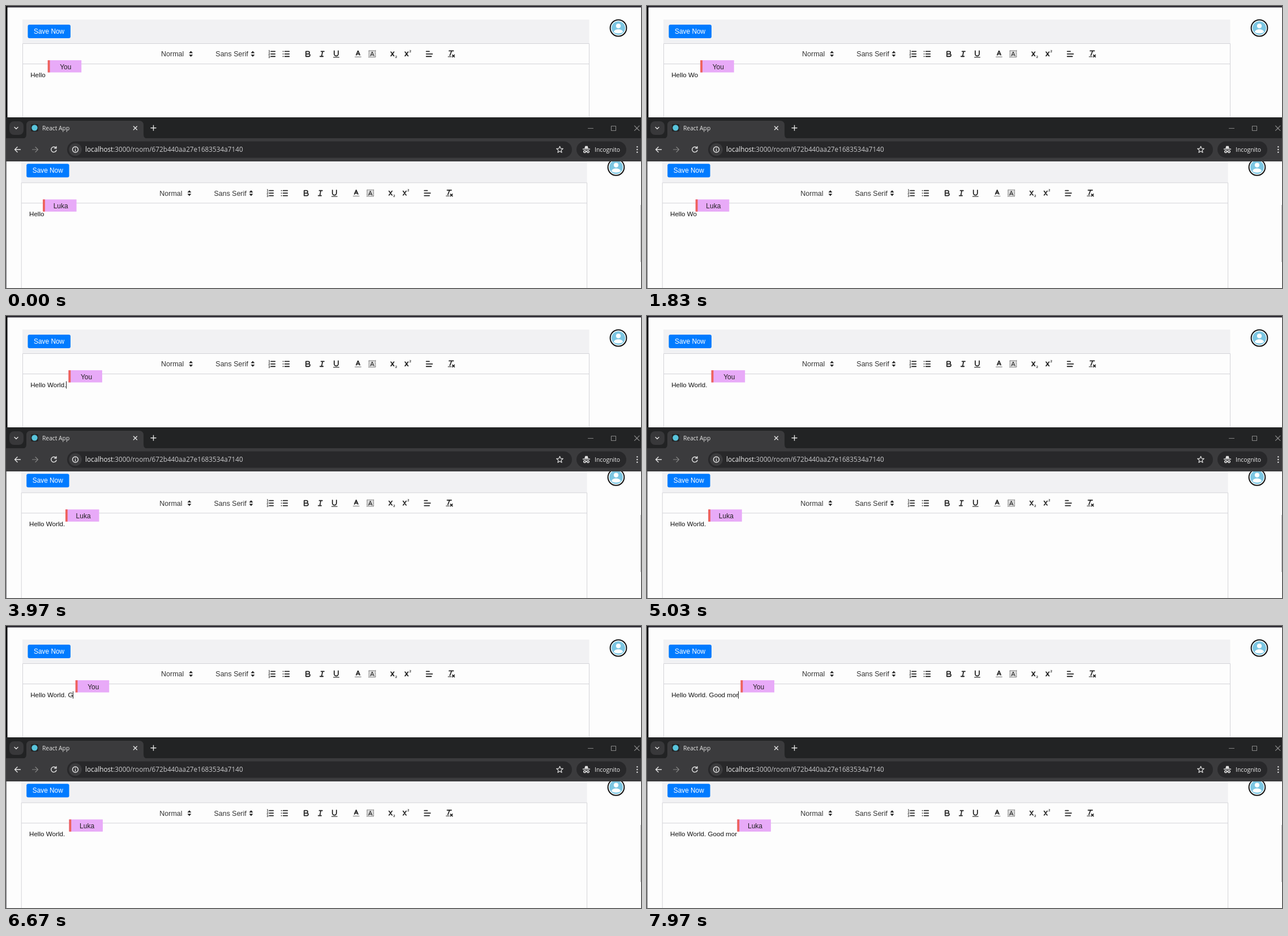
These frames come from a looping animation (1122x499 px, 8000 ms). An HTML page:

```html
<!DOCTYPE html>
<html lang="en">
<head>
<meta charset="utf-8">
<title>Shared editor</title>
<style>
  html, body { margin: 0; width: 100%; height: 100%; overflow: hidden; background: #fdfdfd; }
  svg { display: block; }
  text { font-family: "Liberation Sans", Arial, sans-serif; white-space: pre; }
  .ui text { font-family: "Open Sans", "Noto Sans", sans-serif; }
  .typed { font-size: 11.65px; fill: #111; }
  .tag text { font-size: 12px; text-anchor: middle; fill: #222; }
  .menu { font-size: 12.5px; fill: #333; }
  .line { fill: none; stroke: #262626; stroke-width: 2; stroke-linecap: round; stroke-linejoin: round; }
  .thin { stroke-width: 1.2; }
  .ui .line { stroke: #e3e3e3; stroke-width: 1.4; }
  .ui .dim { stroke: #858585; stroke-width: 1.1; }
  .num { font-size: 6.5px; font-weight: bold; fill: #262626; }
</style>
</head>
<body>
<svg width="1122" height="499" viewBox="0 0 1122 499">
  <defs>
    <path id="arrows" d="M-3.5 -1.2L0 -5.2L3.5 -1.2ZM-3.5 1.2L0 5.2L3.5 1.2Z" fill="#262626"/>
    <g id="page">
      <rect x="-10" width="1150" height="500" fill="#fdfdfd"/>
      <rect x="29" y="24" width="1001.5" height="42" fill="#f1f1f3"/>
      <rect x="38.5" y="33" width="75.5" height="24" rx="3" fill="#007bff"/>
      <text x="49" y="48.7" font-size="11.9" fill="#fff">Save Now</text>
      <path d="M29.5 500V66.5H1030.5V500M29.5 102.5H1030.5" fill="none" stroke="#d3d3d8"/>
      <text class="menu" x="274" y="89.3">Normal</text>
      <use href="#arrows" x="326.7" y="84.8"/>
      <text class="menu" x="370.3" y="89.3">Sans Serif</text>
      <use href="#arrows" x="436" y="84.8"/>
      <g id="icons"></g>
      <circle cx="1082" cy="39" r="14.4" fill="#fff" stroke="#111" stroke-width="2"/>
      <circle cx="1082" cy="39" r="12" fill="#7cc6e2"/>
      <circle cx="1082" cy="35.3" r="4.1" fill="#fff"/>
      <path d="M1074 46.3C1074 39.5 1090 39.5 1090 46.3C1086 49.2 1078 49.2 1074 46.3Z" fill="#fff"/>
    </g>
  </defs>

  <use href="#page"/>
  <g id="top">
    <text class="typed" x="43.2" y="125.7"></text>
    <g class="tag">
      <rect y="96" width="59.5" height="21.5" fill="#e8aaf8"/>
      <rect y="96" width="3.8" height="21.5" fill="#ee625c"/>
      <text x="31.6" y="112">You</text>
    </g>
    <rect class="caret" y="115.5" width="1" height="13" fill="#222"/>
  </g>
  <rect width="1122" height="2.5" fill="#2c2a33"/>
  <rect width="2.5" height="198" fill="#0c0c0e"/>

  <g transform="translate(-2.2 246.3) scale(.9983 1)"><use href="#page"/></g>
  <g id="bottom" transform="translate(-2.2 246.3)">
    <text class="typed" x="43.2" y="125.7"></text>
    <g class="tag">
      <rect y="96" width="59.5" height="21.5" fill="#e8aaf8"/>
      <rect y="96" width="3.8" height="21.5" fill="#ee625c"/>
      <text x="31.6" y="112">Luka</text>
    </g>
  </g>
  <rect y="275" width="1" height="224" fill="#77777c"/>
  <rect x="1121" y="352" width="1" height="101" fill="#b5b5b8"/>

  <g class="ui">
    <rect y="197" width="1122" height="38" fill="#222324"/>
    <rect y="234" width="1122" height="41" fill="#3b3b3d"/>
    <rect x="6" y="204" width="25" height="24" rx="8" fill="#38383a"/>
    <path d="M28 235Q36 235 36 227V211Q36 203 44 203H235Q243 203 243 211V227Q243 235 251 235Z" fill="#3b3b3d"/>
    <path class="line" d="M15 214.5L18 217.5L21 214.5"/>
    <rect x="44" y="209" width="13" height="13" rx="2" fill="#222324"/>
    <circle cx="50.5" cy="215.5" r="5.2" fill="#58c4dc"/>
    <text x="64" y="220" font-size="10.3" fill="#e6e6e6">React App</text>
    <path class="line" d="M225.4 212.9L231.4 218.9M231.4 212.9L225.4 218.9M256 215.8H265M260.5 211.3V220.3"/>
    <path class="line dim" d="M1028.5 216.5H1037.5M1069.5 212.5H1077.5V220.5H1069.5ZM1110.5 212L1119 220.5M1119 212L1110.5 220.5"/>
    <path class="line" d="M25.5 254H15.5M20 249.5L15.5 254L20 258.5M88.2 251A4.7 4.7 0 1 0 89 255.2M88.9 248.6V251.9H85.5"/>
    <path class="line dim" d="M46.5 254H56.5M52 249.5L56.5 254L52 258.5"/>
    <rect x="108" y="239.5" width="892" height="29" rx="14.5" fill="#28282a"/>
    <circle cx="122.5" cy="254" r="11.3" fill="#3b3b3d"/>
    <circle class="line" cx="122.5" cy="254" r="5"/>
    <path class="line" d="M122.5 253.8V256.5M122.5 251.4V251.5"/>
    <text x="140" y="258.2" font-size="11.76" fill="#f2f2f2">localhost<tspan fill="#c9c9cb">:3000/room/672b440aa27e1683534a7140</tspan></text>
    <path id="star" class="line" style="stroke-width:1.2"/>
    <rect x="1008" y="239.5" width="88" height="29" rx="14.5" fill="#28282a"/>
    <path d="M1022.2 252L1023.3 247.8H1027.7L1028.8 252Z" fill="#e3e3e3"/>
    <path class="line" d="M1019.5 253.3H1031.5M1024.6 257.2Q1025.5 256.4 1026.4 257.2"/>
    <circle class="line" cx="1022.6" cy="257.6" r="1.9"/>
    <circle class="line" cx="1028.4" cy="257.6" r="1.9"/>
    <text x="1040" y="258" font-size="10.4" fill="#ececec">Incognito</text>
    <path d="M1115.3 249.3v.01M1115.3 254v.01M1115.3 258.7v.01" stroke="#e3e3e3" stroke-width="2.4" stroke-linecap="round"/>
  </g>
</svg>
<script>
const LOOP = 8000, LAG = 120, LEFT = 43.2, GAP = 4;
const $ = (sel, root = document) => root.querySelector(sel);

// Toolbar icons on an 18-unit grid: [centre x, markup]
const line = (d, cls = '') => `<path class="line ${cls}" d="${d}"/>`;
const num = (x, y, n) => `<text class="num" x="${x}" y="${y}">${n}</text>`;
const letterA = line('M5.5 11L9 3L12.5 11M11.6 9H6.4', 'thin');
const cross = line('M3.5 5L9.5 13M9.5 5L3.5 13');
const icons = [
  [470, line('M7 4H15M7 9H15M7 14H15') + num(1.8, 6, 1) + num(1.8, 11.4, 2) + num(1.8, 16.8, 3)],
  [495, line('M6.5 4H15M6.5 9H15M6.5 14H15M3 4V4.01M3 9V9.01M3 14V14.01')],
  [533.5, line('M5 4H9.5A2.5 2.5 0 0 1 9.5 9H5ZM5 9H10.5A2.5 2.5 0 0 1 10.5 14H5Z')],
  [558.5, line('M7 4H13M5 14H11M8 14L10 4')],
  [583.5, line('M5 3V9A4 4 0 0 0 13 9V3') + '<rect x="3" y="15" width="12" height="1.3" fill="#262626"/>'],
  [622, line('M5.5 11L9 3L12.5 11M11.6 9H6.4') + '<rect x="2.5" y="14" width="13" height="2" fill="#aaa"/>'],
  [647, '<rect x="2.5" y="2.5" width="13" height="13" fill="#ddd" stroke="#555" stroke-width="1.5" stroke-dasharray="1.2 1.2"/>'
    + '<g transform="translate(0 2)">' + letterA + '</g>'],
  [685, cross + num(12, 17, 2)],
  [710, cross + num(12, 6, 2)],
  [748, line('M3 4H9M3 9H15M3 14H13')],
  [787, line('M4.5 3H13M6 12L9.4 3M11 11L15 15M15 11L11 15') + '<rect x="2" y="14" width="7" height="1.2" fill="#262626"/>'],
];
$('#icons').innerHTML = icons.map(([x, body]) =>
  `<g transform="translate(${x - 8} 76.8) scale(.89)">${body}</g>`).join('');

const star = Array.from({ length: 10 }, (_, i) => {
  const r = i % 2 ? 2.7 : 6, a = i * Math.PI / 5;
  return `${978.5 + r * Math.sin(a)} ${254.3 - r * Math.cos(a)}`;
});
$('#star').setAttribute('d', `M${star.join('L')}Z`);

// Keystrokes: [time, character]; '<' deletes
const keys = [
  [500, ' '], [850, 'W'], [1200, 'o'], [1950, 'r'], [2150, 'l'], [2350, 'd'], [2550, ' '],
  [3250, '<'], [3600, '.'], [4300, ' '],
  ...[...'Good mor'].map((c, i) => [6620 + i * 174, c]),
];
const states = [{ t: -700, text: 'Hell' }, { t: -600, text: 'Hello' }];
for (const [t, c] of keys) {
  const { text } = states[states.length - 1];
  states.push({ t, text: c === '<' ? text.slice(0, -1) : text + c });
}
const ctx = document.createElement('canvas').getContext('2d');
ctx.font = '116.5px "Liberation Sans", Arial, sans-serif';
for (const s of states) s.end = LEFT + ctx.measureText(s.text).width / 10;

const indexAt = t => states.reduce((found, s, i) => s.t <= t ? i : found, 1);
const panes = ['#top', '#bottom'].map(id => ({ text: $(id + ' .typed'), tag: $(id + ' .tag') }));
const caret = $('.caret');

function show(pane, text, end) {
  if (pane.text.textContent !== text) pane.text.textContent = text;
  pane.tag.setAttribute('transform', `translate(${end + GAP} 0)`);
}

function draw(now) {
  const t = now % LOOP, i = indexAt(t), s = states[i];
  show(panes[0], s.text, s.end);
  // The remote tag trails by one edit, the remote text by a short delay
  show(panes[1], states[indexAt(t - LAG)].text, states[i - 1].end);
  caret.setAttribute('x', Math.floor(s.end));
  caret.setAttribute('opacity', (t - s.t) % 1000 < 500 ? 1 : 0);
}

const start = performance.now();
function tick() {
  draw(performance.now() - start);
  requestAnimationFrame(tick);
}
tick();
</script>
</body>
</html>
```
